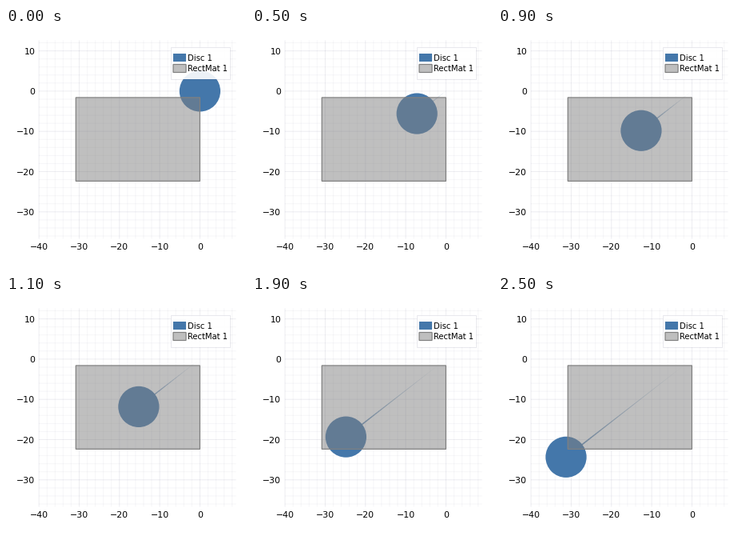
These frames come from a looping animation (300 by 300 pixels, 2.55 s). A matplotlib script:

```python
import matplotlib.pyplot as plt
import numpy as np
from matplotlib.animation import FuncAnimation
from matplotlib.collections import LineCollection
from matplotlib.colors import to_rgb
from matplotlib.patches import Circle, Rectangle

SIZE, DPI = 300, 100
FRAMES, INTERVAL = 51, 50
PT = 72 / DPI                       # points per pixel
SCALE, X0, Y0 = 5.03, 242.4, 78.9   # pixels per unit, origin on stage
LEFT, RIGHT, TOP, BOTTOM = 41, 287.5, 15.5, 263.5
BLUE, GREY, INK = "#4477AA", "#808080", "#222255"

fig = plt.figure(figsize=(SIZE / DPI, SIZE / DPI), dpi=DPI, facecolor="white")
ax = fig.add_axes([0, 0, 1, 1])
ax.set(xlim=(0, SIZE), ylim=(SIZE, 0))
ax.axis("off")


def px(x):
    return X0 + SCALE * x


def py(y):
    return Y0 - SCALE * y


def path(n):
    """Disc centre on stage after n steps, slowing down evenly."""
    run = 3.737 * n - 0.0118 * n**2
    return X0 - run, Y0 + 0.778 * run


def grid_line(xs, ys, major):
    ax.plot(xs, ys, color=INK, alpha=0.08 if major else 0.04,
            lw=PT, snap=False, solid_capstyle="butt", zorder=0)


def label(x, y, text, size, **align):
    ax.text(x, y, text, family="DejaVu Sans", fontsize=size * PT,
            color="black", zorder=7, **align)


def box(x0, y0, x1, y1, z, **style):
    ax.add_patch(Rectangle((x0, y0), x1 - x0, y1 - y0, zorder=z, **style))


def mat(x0, y0, x1, y1, z):
    box(x0, y0, x1, y1, z, fc=GREY, alpha=0.5, lw=0)
    box(x0, y0, x1, y1, z, fc="none", ec=GREY, lw=1.2 * PT, snap=False)


# Grid and tick labels
for v in range(-40, 10, 2):
    grid_line([px(v)] * 2, [TOP, BOTTOM], v % 10 == 0)
for v in range(-36, 14, 2):
    grid_line([LEFT, RIGHT], [py(v)] * 2, v % 10 == 0)
for v in range(-40, 1, 10):
    label(px(v), 277, f"{v}".replace("-", "\u2212"), 11, ha="center", va="baseline")
for v in range(-30, 11, 10):
    label(36.5, py(v) + 4, f"{v}".replace("-", "\u2212"), 11, ha="right", va="baseline")

# Moving parts and the mat above them
trail = LineCollection([], capstyle="butt", zorder=1)
ax.add_collection(trail, autolim=False)
disc = Circle(path(0), 25.6, fc=BLUE, lw=0, zorder=2)
ax.add_patch(disc)
mat(87.3, 86.9, 242.4, 191.4, 3)

# Legend
box(206, 24, 280, 63.5, 5, fc="white", alpha=0.9, lw=0)
box(206, 24, 280, 63.5, 5, fc="none", ec=INK, alpha=0.1, lw=PT)
box(209, 32, 225, 42, 6, fc=BLUE, lw=0)
mat(209, 45.5, 225, 55.5, 6)
label(226.6, 41, "Disc 1", 10, va="baseline")
label(226.6, 54.3, "RectMat 1", 10, va="baseline")


def update(n):
    disc.center = path(n)
    pts = np.column_stack(path(np.arange(n + 1)))
    fade = np.arange(1, n + 1) / max(n, 1)
    trail.set_segments(np.stack([pts[:-1], pts[1:]], axis=1))
    trail.set_linewidths(1.9 * PT * fade if n else [0])
    trail.set_colors([(*to_rgb(BLUE), a) for a in fade])
    return trail, disc


anim = FuncAnimation(fig, update, frames=FRAMES, interval=INTERVAL,
                     repeat=True, repeat_delay=0, blit=False)
plt.show()
```
